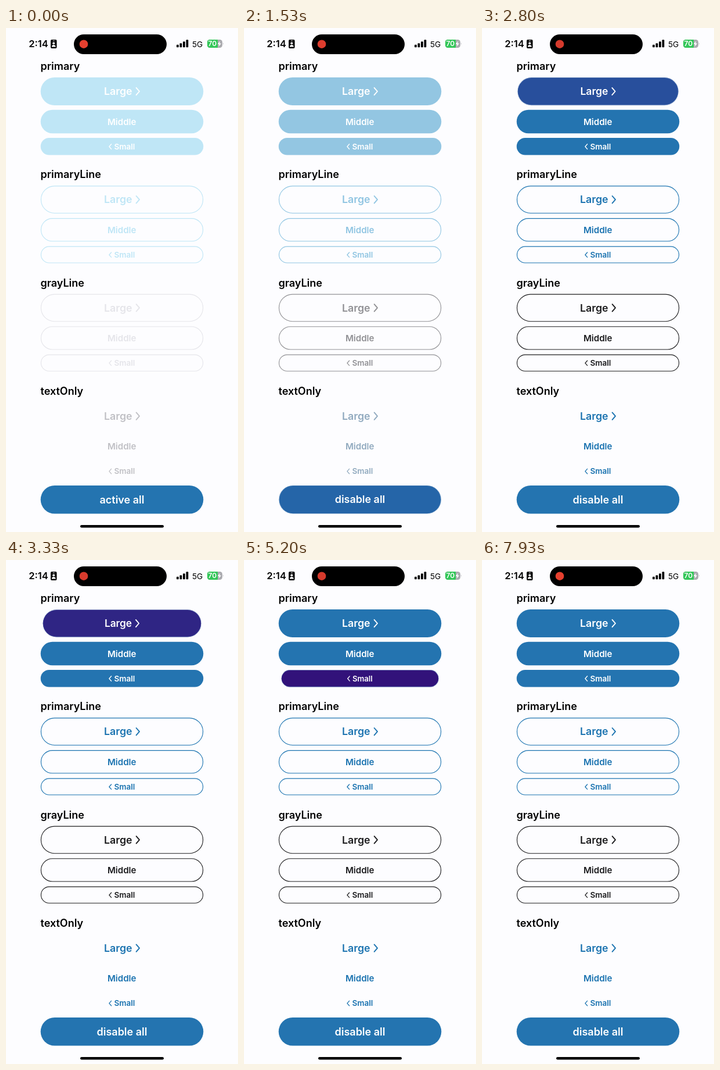
These frames come from a looping animation (400x867 px, 8 s). An HTML page:

```html
<!DOCTYPE html>
<html lang="en">
<head>
<meta charset="utf-8">
<title>Button states</title>
<style>
  html, body { margin: 0; width: 100%; height: 100%; overflow: hidden; background: #fdfdff; }
  svg { display: block; width: 100%; height: 100%; }
  text { font-family: Inter, "Open Sans", sans-serif; font-weight: 600; }
  .title { font-size: 18px; }
  .chevron { fill: none; stroke: currentColor; stroke-linecap: round; stroke-linejoin: round; }
  .label { fill: currentColor; }

  .filled, .lined, .gray, .plain { animation: 8s linear infinite; }
  .filled { animation-name: filled; }
  .lined { animation-name: lined; }
  .gray { animation-name: gray; }
  .plain { animation-name: plain; }
  .face { fill: currentColor; }
  .outline { fill: none; stroke: currentColor; stroke-width: 1.1; }
  .on-face { color: #fff; }

  .press { transform-box: fill-box; transform-origin: center; animation: press 8s linear infinite; }
  .tint { fill: #32127a; opacity: 0; animation: tint 8s linear infinite; }
  .press, .tint { animation-delay: calc(var(--start) - 8s); }
  .before { animation: before 8s step-end infinite; }
  .after { animation: after 8s step-end infinite; }
  .dot { fill: #e6402f; animation: pulse 1s ease-in-out infinite alternate; }

  @keyframes filled { 0%, 18.2% { color: #bfe6f6; } 21.5%, 100% { color: #2474b0; } }
  @keyframes lined { 0%, 18.2% { color: #bfe6f6; } 21.5%, 100% { color: #1b73b0; } }
  @keyframes gray { 0%, 17.8% { color: #e5e5ea; } 21%, 100% { color: #1c1c1e; } }
  @keyframes plain { 0%, 18.2% { color: #c0c0c5; } 21.5%, 100% { color: #1b73b0; } }
  @keyframes press { 0%, 9.2%, 100% { transform: none; } 2.2%, 7% { transform: scale(.964); } }
  @keyframes tint { 0%, 9.2%, 100% { opacity: 0; } 2.2%, 7% { opacity: 1; } }
  @keyframes before { 0% { opacity: 1; } 18% { opacity: 0; } }
  @keyframes after { 0% { opacity: 0; } 18% { opacity: 1; } }
  @keyframes pulse { to { fill: #d4392c; } }
</style>
</head>
<body>
<svg viewBox="0 0 400 867" preserveAspectRatio="none">
  <g id="status">
    <text x="39.3" y="33" font-size="16.5">2:14</text>
    <rect x="77" y="20" width="10.5" height="15" rx="2"/>
    <g fill="#fff">
      <rect x="80.5" y="21.4" width="3.5" height="1" rx=".5"/>
      <circle cx="82.2" cy="26.2" r="2"/>
      <path d="M78.8 32.6a3.4 3.6 0 0 1 6.8 0z"/>
    </g>
    <rect x="117" y="11" width="160" height="34" rx="17"/>
    <circle class="dot" cx="134" cy="27.7" r="7.3"/>
    <g id="signal"></g>
    <text x="321" y="33" font-size="13.7" style="font-weight:400">5G</text>
    <rect x="347" y="20" width="26" height="14" rx="4.5" fill="#aaaaaf"/>
    <path d="M351.5 20H365V34H351.5A4.5 4.5 0 0 1 347 29.5V24.5A4.5 4.5 0 0 1 351.5 20z" fill="#34c759"/>
    <path d="M374 25q1.6 2 0 4z" fill="#aaaaaf"/>
    <text x="348.6" y="31.3" font-size="12" fill="#fff">70</text>
    <path d="M369 22.5l-4.3 5.3h2.8l-1 4.2 4.6-5.5h-2.9z" fill="#fff"/>
  </g>
  <g id="groups"></g>
  <g class="press" style="--start:820ms">
    <rect x="59.7" y="787" width="280.6" height="48.5" rx="24.2" fill="#2474b0"/>
    <rect class="tint" x="59.7" y="787" width="280.6" height="48.5" rx="24.2"/>
    <g font-size="18" fill="#fff" text-anchor="middle">
      <text class="before" x="200" y="817.5">active all</text>
      <text class="after" x="200" y="817.5">disable all</text>
    </g>
  </g>
  <rect x="128" y="855" width="144" height="4.4" rx="2.2"/>
</svg>
<script>
  const PITCH = 186.2;
  const sizes = [
    { name: 'Large', top: 85, height: 48, font: 17.8, x: 169, base: 115.3, start: 2736,
      chevron: 'M224.6 102.8l5.4 6.2-5.4 6.2', weight: 1.9 },
    { name: 'Middle', top: 140.7, height: 40.6, font: 15.1, x: 174.9, base: 166.8, start: 3860 },
    { name: 'Small', top: 189, height: 29.5, font: 13.6, x: 186.4, base: 208.7, start: 4850,
      chevron: 'M181.6 199.8l-3.7 4.2 3.7 4.2', weight: 1.3 }
  ];
  const kinds = [
    ['primary', 'filled'], ['primaryLine', 'lined'], ['grayLine', 'gray'], ['textOnly', 'plain']
  ];

  const pill = (cls, { top, height }, inset = 0) =>
    `<rect class="${cls}" x="${59.7 + inset}" y="${top + inset}" width="${280.6 - 2 * inset}"
      height="${height - 2 * inset}" rx="${height / 2 - inset}"/>`;

  const label = s =>
    `<text class="label" x="${s.x}" y="${s.base}" font-size="${s.font}">${s.name}</text>` +
    (s.chevron ? `<path class="chevron" d="${s.chevron}" stroke-width="${s.weight}"/>` : '');

  function button(style, size) {
    if (style === 'filled') {
      return `<g class="press" style="--start:${size.start}ms">${pill('face', size)}
        ${pill('tint', size)}<g class="on-face">${label(size)}</g></g>`;
    }
    return (style === 'plain' ? '' : pill('outline', size, .7)) + label(size);
  }

  document.getElementById('groups').innerHTML = kinds.map(([title, style], i) =>
    `<g transform="translate(0 ${i * PITCH})">
      <text class="title" x="59.5" y="72.3">${title}</text>
      <g class="${style}">${sizes.map(size => button(style, size)).join('')}</g>
    </g>`).join('');

  document.getElementById('signal').innerHTML = [4.5, 7, 10, 13].map((h, i) =>
    `<rect x="${294 + i * 5.5}" y="${33.3 - h}" width="3.8" height="${h}" rx="1"/>`).join('');
</script>
</body>
</html>
```
